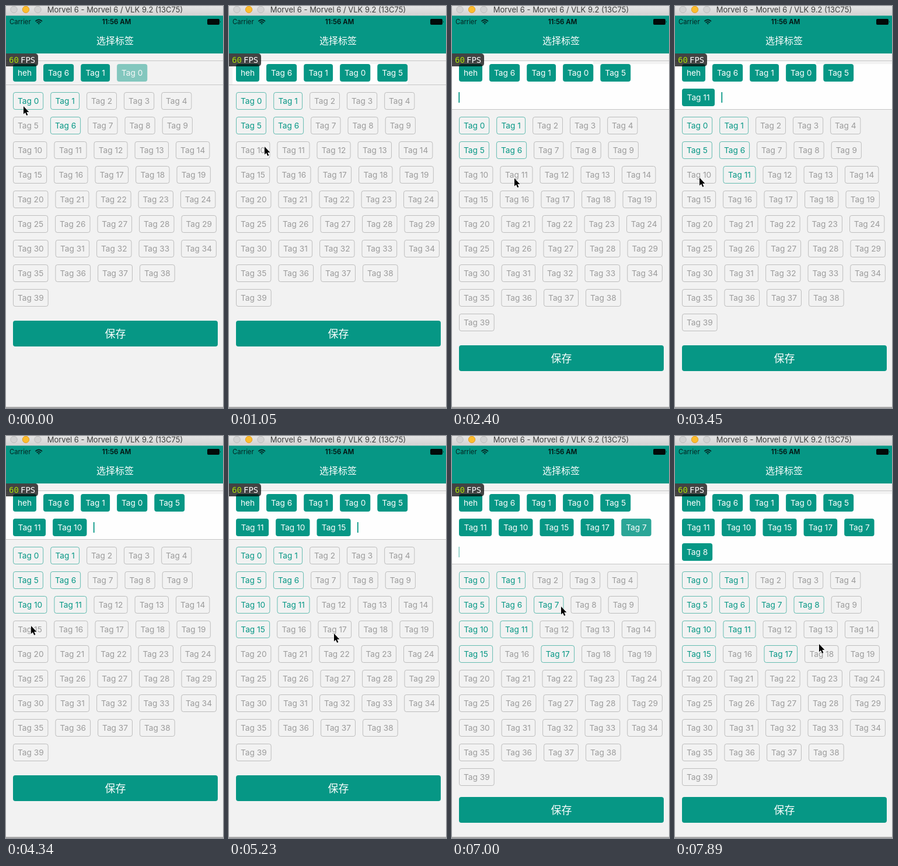
Recreate the animation shown at these times as an HTML page. Size 372 by 686 pixels, loop 8 s.

```html
<!DOCTYPE html>
<html lang="zh">
<head>
<meta charset="utf-8">
<title>选择标签</title>
<style>
  html, body { margin: 0; width: 100%; height: 100%; overflow: hidden; background: #f2f2f2; }
  svg { display: block; width: 372px; height: 686px; }
  text { font-family: Inter, "Noto Sans CJK SC", "Noto Sans CJK", sans-serif; }
  .mid, .tag { text-anchor: middle; }
  .tag { font-size: 13.7px; }
  text.mono { font: 14px "DejaVu Sans Mono", monospace; }
</style>
</head>
<body>
<svg viewBox="0 0 372 686">
  <defs>
    <linearGradient id="chrome" x2="0" y2="1">
      <stop stop-color="#e4e4e4"/><stop offset="1" stop-color="#d2d2d2"/>
    </linearGradient>
  </defs>
  <rect width="372" height="686" fill="#f2f2f2"/>
  <rect id="strip" x="6" y="94" width="236" height="5" fill="#fefefe"/>
  <rect id="field" y="99" fill="#fefefe"/>
  <rect y="93" width="372" height="1" fill="#c6c6c6"/>
  <rect id="rule" width="372" height="1" fill="#c6c6c6"/>
  <g id="chosen"></g>
  <rect id="caret" width="1.8" height="18" fill="#069785"/>
  <g id="list"></g>
  <g id="save">
    <rect x="12" width="351" height="44" rx="4" fill="#069785"/>
    <text class="mid" x="187.5" y="28.5" font-size="18" fill="#fff">保存</text>
  </g>

  <rect width="372" height="17" fill="url(#chrome)"/>
  <circle cx="13.5" cy="6" r="5.7" fill="#d2d2d2" stroke="#bcbcbc"/>
  <circle cx="34" cy="6" r="5.7" fill="#fdbc2e" stroke="#e0a02a"/>
  <circle cx="54.5" cy="6" r="5.7" fill="#d2d2d2" stroke="#bcbcbc"/>
  <text class="mid" x="187" y="11" font-size="13" fill="#3c3c3c">Morvel 6 - Morvel 6 / VLK 9.2 (13C75)</text>

  <rect y="16.5" width="372" height="64.5" fill="#069785"/>
  <text x="6" y="31" font-size="11.2" fill="#04211e">Carrier</text>
  <g fill="none" stroke="#04211e" stroke-width="1.7">
    <path d="M50.4 26.1Q56.2 20.9 62 26.1M52.6 28.4Q56.2 25.2 59.8 28.4"/>
    <path d="M54.4 29.6Q56.2 28.2 58 29.6L56.2 31.6Z" fill="#04211e" stroke="none"/>
  </g>
  <text class="mid" x="189.5" y="31" font-size="11.5" font-weight="600" fill="#04110f">11:56 AM</text>
  <rect x="345" y="22" width="21" height="10" rx="2" fill="#020a09"/>
  <path d="M367 25.2Q368.8 27 367 28.8Z" fill="#020a09"/>
  <text class="mid" x="187" y="65" font-size="16" fill="#fff">选择标签</text>

  <rect x="-6" y="81" width="61" height="22" rx="5" fill="#000" fill-opacity=".72"/>
  <text class="mono" x="5" y="97" fill="#a5dc0a">60</text>
  <text class="mono" x="25" y="97" fill="#fff">FPS</text>

  <rect y="684" width="372" height="2" fill="#a9a9a9"/>
  <path id="cursor" d="M0 0V13.4L3 10.7L5.2 15.8L7.4 14.9L5.2 9.9H9.4Z" stroke="#fff" paint-order="stroke"/>
</svg>
<script>
const LOOP = 8000, TEAL = '#069785', LEFT = 12, GAP = 12, PITCH = 42;
const RIGHT = 362, MIN_FIELD = 77;    // right margin, least room for typing
const FADE = 400, SETTLE = 600;       // tag fade-in, wait before the field grows
const NARROW = { 1: 2.3, 7: .8, 2: .3, 5: .3 };

// label and the time it is picked
const PICKS = [['heh', -9e3], [6, -9e3], [1, -9e3], [0, -190], [5, 600],
  [11, 2900], [10, 3500], [15, 4450], [17, 5450], [7, 6700], [8, 7450]];

// pointer stops: time, x, y
const STOPS = [[0, 30, 171], [450, 36, 204], [1050, 61, 240], [1500, 50, 280],
  [2400, 107, 294], [3400, 42, 293], [4340, 43, 324], [5100, 180, 337],
  [5960, 201, 288], [6400, 187, 291], [7400, 224, 294], [7890, 247, 355]];
const REST = .6;                      // share of each leg spent waiting

const $ = id => document.getElementById(id);
const clamp = v => Math.max(0, Math.min(1, v));
const ease = v => v * v * (3 - 2 * v);

function set(el, attrs) {
  for (const k in attrs) el.setAttribute(k, attrs[k]);
}
function add(parent, name, attrs = {}, text = '') {
  const el = document.createElementNS('http://www.w3.org/2000/svg', name);
  set(el, attrs);
  el.textContent = text;
  return parent.appendChild(el);
}

const caption = label => label === 'heh' ? label : 'Tag ' + label;
const width = label => label === 'heh' ? 40
  : [...String(label)].reduce((sum, d) => sum + 8.5 - (NARROW[d] || 0), 43.7);

// Places labels left to right, wrapping at the right margin.
function flow(labels) {
  let x = LEFT, row = 0;
  return labels.map(label => {
    const w = width(label);
    if (x + w > RIGHT) { x = LEFT; row++; }
    const spot = { label, x, w, row };
    x += w + GAP;
    return spot;
  });
}

function makeTag(parent, { label, x, w, row }, top, filled) {
  const g = add(parent, 'g'), y = top + row * PITCH;
  const box = add(g, 'rect', filled
    ? { x, y, width: w, height: 30, rx: 4, fill: TEAL }
    : { x: x + .5, y: y + .5, width: w - 1, height: 29, rx: 3.5, fill: 'none', 'stroke-width': .6 });
  const text = add(g, 'text', { class: 'tag', x: x + w / 2, y: y + 20, fill: '#fff' }, caption(label));
  return { g, box, text };
}

const picked = flow(PICKS.map(p => p[0])).map((spot, i) =>
  ({ ...spot, at: PICKS[i][1], ...makeTag($('chosen'), spot, 99, true) }));
const options = flow([...Array(40).keys()]).map(spot => {
  const pick = PICKS.find(p => p[0] === spot.label);
  return { at: pick ? pick[1] : Infinity, ...makeTag($('list'), spot, 147, false) };
});

const lastPick = t => picked.filter(p => t >= p.at).pop();

// Where typing goes on after the tags picked by time t.
function tail(t) {
  const { x, w, row } = lastPick(t), next = x + w + GAP;
  return next + MIN_FIELD > RIGHT ? { x: LEFT, row: row + 1 } : { x: next, row };
}

function pointer(t) {
  const i = STOPS.findIndex(s => s[0] > t);
  if (i < 0) return STOPS[STOPS.length - 1].slice(1);
  const [t0, x0, y0] = STOPS[i - 1], [t1, x1, y1] = STOPS[i];
  const k = ease(clamp(((t - t0) / (t1 - t0) - REST) / (1 - REST)));
  return [x0 + (x1 - x0) * k, y0 + (y1 - y0) * k];
}

const blink = t => clamp((.42 - Math.abs((t / 1000 + .15) % 1 - .5)) / .16);

function draw(t) {
  const rows = tail(t - SETTLE).row, shift = rows * PITCH;

  const last = lastPick(t), opened = t >= 150;
  set($('strip'), { opacity: +opened });
  set($('field'), rows
    ? { x: 0, width: 372, height: 35 + shift, opacity: 1 }
    : { x: 6, width: last.x + last.w - 6, height: 35, opacity: +opened });
  set($('rule'), { y: 134 + shift });

  const end = tail(t);
  set($('caret'), {
    x: end.x - .7, y: 105 + end.row * PITCH,
    opacity: rows && end.row <= rows ? blink(t) : 0
  });

  for (const p of picked) set(p.g, { opacity: ease(clamp((t - p.at) / FADE)) });
  for (const o of options) {
    const color = t >= o.at ? TEAL : '#9b9b9b';
    set(o.box, { stroke: color });
    set(o.text, { fill: color });
  }
  set($('list'), { transform: `translate(0 ${shift})` });
  set($('save'), { transform: `translate(0 ${Math.min(616, 537 + shift)})` });
  set($('cursor'), { transform: `translate(${pointer(t)})` });
}

const start = performance.now();
function tick(now) {
  draw(Math.max(0, now - start) % LOOP);
  requestAnimationFrame(tick);
}
draw(0);
requestAnimationFrame(tick);
</script>
</body>
</html>
```
